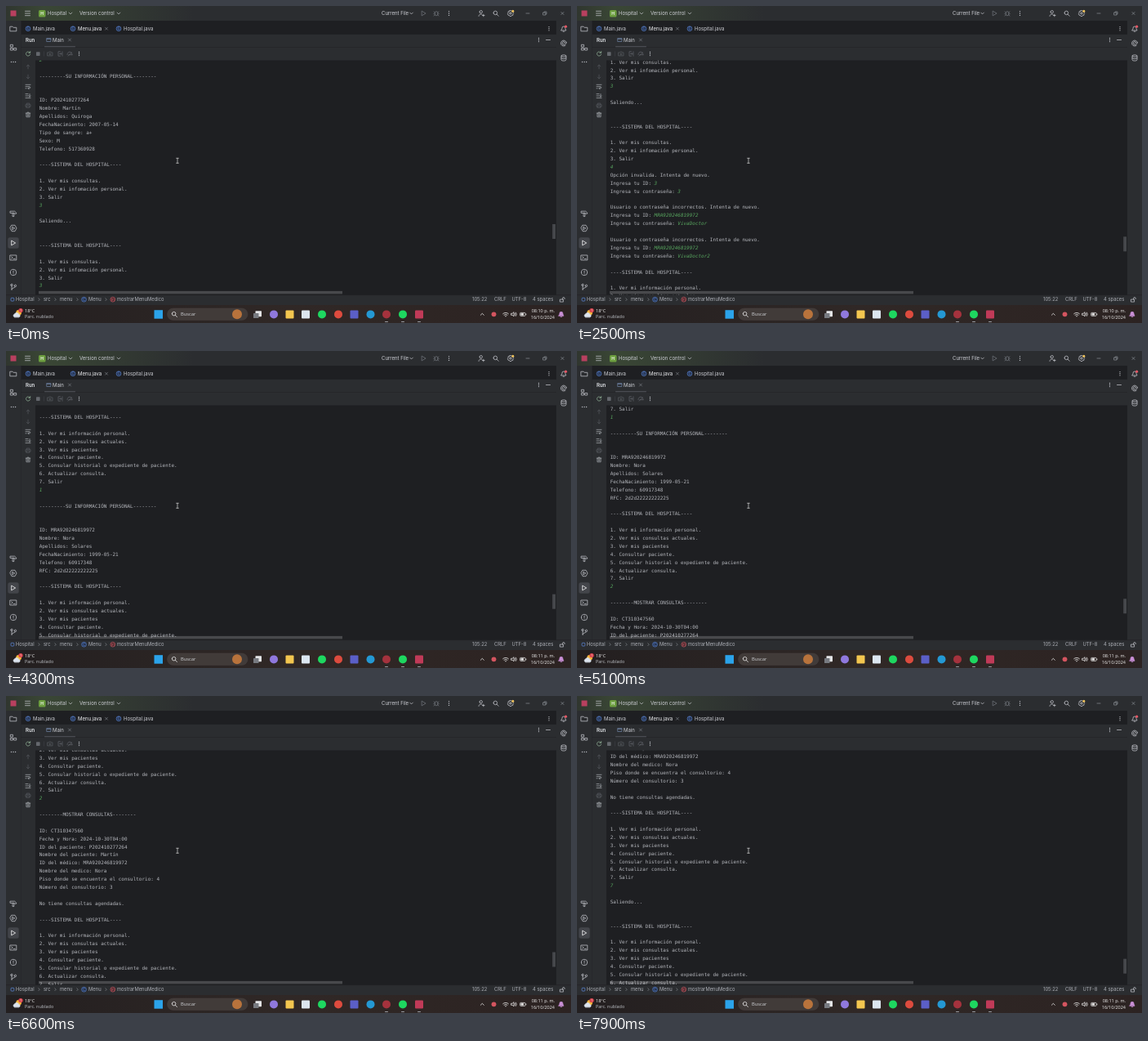
Animation of 692 by 388 pixels, one loop 8 s. Source, as an HTML page:

```html
<!DOCTYPE html>
<html lang="es">
<head>
<meta charset="utf-8">
<style>
html, body { margin: 0; width: 100%; height: 100%; overflow: hidden; background: #1e1f22; }
svg { display: block; width: 692px; height: 388px; }
text { font: 6px Inter, sans-serif; fill: #cdcfd5; white-space: pre; }
.strong { font-weight: 600; fill: #e4e6ea; }
.mono text { font: 5.98px "DejaVu Sans Mono", monospace; fill: #b4b6bc; }
.mono tspan { fill: #58a65f; font-style: italic; }
.task text { font: 5.5px "Open Sans", sans-serif; fill: #f0f0f0; }
.task .search { font-size: 5.8px; fill: #d2d4d8; }
</style>
</head>
<body>
<svg id="stage" viewBox="0 0 692 388">
  <defs>
    <clipPath id="view"><rect x="36" y="66.5" width="637" height="287"/></clipPath>
    <linearGradient id="tint">
      <stop offset="0" stop-color="#30362f"/>
      <stop offset=".2" stop-color="#3a4735"/>
      <stop offset="1" stop-color="#2b2d30"/>
    </linearGradient>
    <linearGradient id="bar">
      <stop offset="0" stop-color="#231f20"/>
      <stop offset=".5" stop-color="#302826"/>
      <stop offset="1" stop-color="#2c2322"/>
    </linearGradient>
  </defs>
</svg>
<script>
const PITCH = 9.88, FIRST_Y = 87.6;
const stage = document.getElementById('stage');

// Drawing helpers, each returns markup
const rect = (x, y, w, h, fill, r = 0, more = '') =>
  `<rect x="${x}" y="${y}" width="${w}" height="${h}" rx="${r}" fill="${fill}" ${more}/>`;
const dot = (x, y, r, fill, more = '') =>
  `<circle cx="${x}" cy="${y}" r="${r}" fill="${fill}" ${more}/>`;
const label = (x, y, s, more = '') => `<text x="${x}" y="${y + 2.1}" ${more}>${s}</text>`;
const icon = (x, y, d, color = '#c3c5cb', fill = 'none') =>
  `<path transform="translate(${x} ${y})" d="${d}" fill="${fill}" stroke="${color}" stroke-width=".75" stroke-linecap="round" stroke-linejoin="round"/>`;
const circ = r => `M${-r} 0a${r} ${r} 0 1 0 ${2 * r} 0a${r} ${r} 0 1 0 ${-2 * r} 0`;
const dots = (x, y, dx, dy) =>
  [-1, 0, 1].map(i => dot(x + i * dx, y + i * dy, .65, '#c3c5cb')).join('');
const badge = (x, y, s, line, fill) =>
  dot(x, y, 2.9, fill, `stroke="${line}" stroke-width=".6"`) +
  `<text x="${x}" y="${y + 1.5}" text-anchor="middle" style="font-size:4.2px;fill:${line}">${s}</text>`;
const classIcon = (x, y) => badge(x, y, 'C', '#5f8be0', '#25324d');

const CHEVRON = 'M-1.8-.9L0 .9L1.8-.9';
const CROSS = 'M-1.5-1.5L1.5 1.5M1.5-1.5L-1.5 1.5';
const PLAY = 'M-2-2.7L2.6 0L-2 2.7Z';
const GLASS = 'M-3-.6a2.3 2.3 0 1 0 4.6 0a2.3 2.3 0 1 0-4.6 0M1 1.1L3.2 3.3';
const BELL = 'M-3 2H3L2-.4V-1a2 2 0 0 0-4 0V-.4ZM-.8 3.2H.8';

// Console transcript; text after ~ is typed by the user
const title = s => `----${s}----`;
const patientMenu = choice => [title('SISTEMA DEL HOSPITAL'), '', '1. Ver mis consultas.',
  '2. Ver mi infomación personal.', '3. Salir', '~' + choice];
const doctorMenu = choice => [title('SISTEMA DEL HOSPITAL'), '', '1. Ver mi información personal.',
  '2. Ver mis consultas actuales.', '3. Ver mis pacientes', '4. Consultar paciente.',
  '5. Consular historial o expediente de paciente.', '6. Actualizar consulta.', '7. Salir', '~' + choice];
const login = (id, pass) => ['Ingresa tu ID: ~' + id, 'Ingresa tu contraseña: ~' + pass, ''];
const leave = ['', 'Saliendo...', '', ''];
const personal = ['---------SU INFORMACIÓN PERSONAL--------', '', ''];
const wrong = 'Usuario o contraseña incorrectos. Intenta de nuevo.';
const doctorId = 'MRA920246819972', patientId = 'P202410277264';
const lines = [
  '~2', '', ...personal,
  'ID: ' + patientId, 'Nombre: Martín', 'Apellidos: Quiroga', 'FechaNacimiento: 2007-05-14',
  'Tipo de sangre: a+', 'Sexo: M', 'Telefono: 517360928', '',
  ...patientMenu(3), ...leave, ...patientMenu(3), ...leave, ...patientMenu(4),
  'Opción invalida. Intenta de nuevo.', ...login(3, 3),
  wrong, ...login(doctorId, 'VivaDoctor'), wrong, ...login(doctorId, 'VivaDoctor2'),
  ...doctorMenu(1), '', ...personal,
  'ID: ' + doctorId, 'Nombre: Nora', 'Apellidos: Solares', 'FechaNacimiento: 1999-05-21',
  'Telefono: 60917348', 'RFC: 2d2d22222222225', '',
  ...doctorMenu(2), '', '--------MOSTRAR CONSULTAS--------', '',
  'ID: CT310347560', 'Fecha y Hora: 2024-10-30T04:00', 'ID del paciente: ' + patientId,
  'Nombre del paciente: Martín', 'ID del médico: ' + doctorId, 'Nombre del medico: Nora',
  'Piso donde se encuentra el consultorio: 4', 'Número del consultorio: 3', '',
  'No tiene consultas agendadas.', '',
  ...doctorMenu(7), ...leave, ...doctorMenu(7)
];
const transcript = lines.map((s, i) => {
  const [out, typed] = s.split('~');
  return `<text x="40.7" y="${FIRST_Y + (i - 2) * PITCH}">${out}${typed ? `<tspan>${typed}</tspan>` : ''}</text>`;
}).join('');

const panels = rect(0, 0, 692, 388, '#1e1f22') + rect(0, 0, 692, 18, '#2b2d30') +
  rect(0, 0, 230, 18, 'url(#tint)') + rect(0, 18, 18.5, 336, '#2b2d30') +
  rect(674, 18, 18, 336, '#2b2d30') + rect(18.5, 34.5, 655.5, 32, '#2b2d30') +
  rect(18.5, 66, 17.5, 288, '#2b2d30') + rect(18.5, 34, 655.5, .6, '#1e1f22') +
  rect(18.5, 50, 655.5, .5, '#1e1f22') + rect(0, 353.7, 692, 12.5, '#2b2d30') +
  rect(0, 353.6, 692, .5, '#1e1f22');

const titleBar = rect(5.5, 5.5, 7, 7, '#b8405f') +
  icon(26.5, 9, 'M-3-2.7H3M-3 0H3M-3 2.7H3') + rect(40, 5, 8.5, 8.5, '#6c9e3f', 1.5) +
  `<text x="44.2" y="11" text-anchor="middle" style="font-size:5px;font-weight:600;fill:#fff">H</text>` +
  label(51, 9, 'Hospital') + icon(79, 9, CHEVRON) +
  label(90, 9, 'Version control') + icon(138, 9, CHEVRON) +
  label(460, 9, 'Current File') + icon(496.5, 9, CHEVRON) + icon(511.5, 9, PLAY, '#6f737a') +
  icon(527, 9, 'M-1.8-.5a1.8 1.8 0 0 1 3.6 0V1a1.8 1.8 0 0 1-3.6 0ZM-3-2L-1.8-.8M3-2L1.8-.8M-3.2.6H-1.8M3.2.6H1.8M-3 3L-1.6 1.8M3 3L1.6 1.8', '#6f737a') +
  dots(542.5, 9, 0, 2.4) +
  icon(582, 9, 'M-2-1.8a1.7 1.7 0 1 0 3.4 0a1.7 1.7 0 1 0-3.4 0M-3 3.4C-3 .4 1 .4 1.4 2M1.5 2.5H4M2.8 1.2V3.8') +
  icon(600, 9, GLASS) +
  icon(618, 9, circ(1.2) + 'M-1-3.4H1L1.6-2.3L3-2.2L3.7-.5L3 .6L3 2.2L1.5 2.5L.9 3.5H-1L-1.6 2.4L-3 2.2L-3.6.5L-3-.7L-3-2.2L-1.6-2.4Z') +
  dot(620.8, 6.2, 1.5, '#f2c55c') +
  icon(639, 9, 'M-2 0H2', '#85888f') +
  icon(660, 9, 'M-2-1H1V2H-2ZM-1-1V-2H2V1H1', '#85888f') + icon(681.5, 9, CROSS, '#85888f');

const tabs = [[27, 'Main.java'], [82, 'Menu.java', 'style="fill:#f0f1f4"'], [138, 'Hospital.java']]
  .map(([x, s, more]) => classIcon(x, 27.7) + label(x + 6, 27.7, s, more)).join('') +
  icon(123, 27.7, CROSS, '#75787f') + dots(665, 27.7, 0, 2.1);

const runHeader = label(24, 41.5, 'Run', 'class="strong"') +
  icon(52.5, 41.5, 'M-2.4-2H2.4V2H-2.4ZM-2.4-.9H2.4', '#6b7f9f') + label(57, 41.5, 'Main') +
  icon(78, 41.5, CROSS, '#75787f') + rect(47, 49.2, 38, 1, '#54575d', .5) +
  dots(652.5, 41.5, 0, 2.1) + icon(664, 41.5, 'M-2.5 0H2.5') +
  icon(27, 58.5, 'M2.4-1.2A2.6 2.6 0 1 0 2.6.8M2.7-3V-1.1H.8', '#8fae95') +
  rect(37, 56.3, 4.6, 4.6, '#65686e', .6) + rect(46, 55.5, .5, 6, '#43454a') +
  icon(54, 58.5, 'M-3-1.6H-1.4L-.8-2.5H.8L1.4-1.6H3V2.4H-3ZM-1 .4a1 1 0 1 0 2 0a1 1 0 1 0-2 0', '#55585e') +
  icon(66.5, 58.5, 'M0-2.7H-2.5V2.7H0M2.5-2.7V2.7M-1 0H1.5M.4-1.1L1.5 0L.4 1.1', '#5c5f66') +
  icon(78, 58.5, 'M-3 1.2C-3-3.6 3-3.6 3 1.2M-2 2.6L2.6-1.6M-1 1.2H3', '#5c5f66') +
  dots(89.5, 58.5, 0, 2.1);

const consoleTools = icon(27, 74.5, 'M0 2.4V-2.4M-1.8-.6L0-2.4L1.8-.6', '#53565c') +
  icon(27, 86.5, 'M0-2.4V2.4M-1.8.6L0 2.4L1.8.6', '#53565c') +
  icon(27, 98.3, 'M-3-2H3M-3 .3H2A1.2 1.2 0 0 1 2 2.5H0M1-1.4M1 1.4L0 2.5L1 3.4M-3 2.5H-2', '#a5a8ae') +
  icon(27, 110, 'M-3-2.4H0M-3 0H0M-3 2.6H3M2-2.4V1M.8 0L2 1.2L3.2 0', '#a5a8ae') +
  icon(27, 121.7, 'M-1.8-1V-2.6H1.8V-1M-1.8 1.5H-3V-1H3V1.5H1.8M-1.8.6H1.8V2.7H-1.8Z', '#53565c') +
  icon(27, 133, 'M-2.8-1.8H2.8M-1-1.8V-2.8H1V-1.8M-2.1-1.8V2.8H2.1V-1.8M-.7-.4V1.5M.7-.4V1.5', '#a5a8ae');

const sideBars = rect(2.3, 283.3, 13.4, 13.4, '#43454a', 2.5) +
  icon(9, 28, 'M-3.8-2.8H-1L0-1.7H3.8V2.8H-3.8Z') +
  icon(9, 50.5, 'M-3.3-3.2H-.6V-.5H-3.3ZM-3.3 1H-.6V3.5H-3.3ZM1 1H3.7V3.5H1Z') + dots(9, 68.5, 2.6, 0) +
  icon(9, 254, 'M-3.6-2.8H1.6L3.6-1V.2H1.4L1-.6H-3.6ZM-1-.6V3.6H.8V-.6') +
  icon(9, 272, 'M-2-3.7H2L4 0L2 3.7H-2L-4 0ZM-1-1.6L1.7 0L-1 1.6Z') +
  icon(9, 290, PLAY, '#fff') +
  icon(9, 308, 'M-3.8-3H3.8V3H-3.8ZM-2.2-1.2L-.8 0L-2.2 1.2M.3 1.4H2.2') +
  icon(9, 326, circ(3.7) + 'M0-1.9V.4M0 1.8V1.9') +
  icon(9, 344, 'M-2-1.6V3.6M-3.2-2.6a1.2 1.2 0 1 0 2.4 0a1.2 1.2 0 1 0-2.4 0M1.2-1.6a1.2 1.2 0 1 0 2.4 0a1.2 1.2 0 1 0-2.4 0M2.4-.4C2.4 1.5-2 .5-2 2.6') +
  icon(683, 28, BELL) + dot(685.6, 25.2, 1.6, '#e55765') +
  icon(683, 45.5, 'M3.4-1A3.5 3.5 0 1 0 2 3M2-.2A2 2 0 1 0 0 2C2 2 3.4 1 3.4-1M-.2 0H.2') +
  icon(683, 63.5, 'M-3-2.4a3 1.2 0 1 0 6 0a3 1.2 0 1 0-6 0V2.4a3 1.2 0 0 0 6 0V-2.4M-3 0a3 1.2 0 0 0 6 0');

const statusBar = rect(6, 357.3, 3.8, 3.8, 'none', .8, 'stroke="#5f8be0" stroke-width=".7"') +
  [[12, 'Hospital'], [46, 'src'], [66, 'menu'], [101, 'Menu'], [136, 'mostrarMenuMedico'],
    [571, '105:22'], [598, 'CRLF'], [619.5, 'UTF-8'], [645, '4 spaces']]
    .map(([x, s]) => label(x, 359.2, s, 'style="font-size:5.85px;fill:#acafb6"')).join('') +
  [40.5, 60.5, 87.5, 122.5].map(x => icon(x, 359.2, 'M-.7-1.5L.8 0L-.7 1.5', '#7a7e85')).join('') +
  classIcon(95.5, 359.2) + badge(130.8, 359.2, 'm', '#e0646c', '#40252b') +
  icon(681, 359.5, 'M-2.2-.4H1.6V2.6H-2.2ZM.6-.4V-1.6a1.3 1.3 0 0 1 2.6 0V-1');

const apps = [[328, '#8f78dd', 5], [347.5, '#f3c64f', 1], [367, '#dce6f0', 1], [387, '#1ed760', 5],
  [407, '#dd4b3e', 5], [426.5, '#5b5fc7', 1], [446.5, '#2498d3', 5], [466, '#a5323d', 5],
  [486, '#1ed760', 5], [506, '#c03a58', 1]];
const taskBar = rect(0, 366, 692, 22, 'url(#bar)') +
  dot(15.6, 375.3, 3.4, '#f5b63d') +
  icon(13.5, 378.4, 'M-3.3 2.4A2 2 0 0 1-3-1.3A2.8 2.8 0 0 1 2.2-1A1.8 1.8 0 0 1 2.6 2.4Z', '#dde4ee', '#dde4ee') +
  dot(18, 372.6, 2.7, '#d9434e') + '<text x="16.9" y="374.1" style="font-size:4px">1</text>' +
  label(23, 373, '18°C') + label(23, 380.3, 'Parc. nublado', 'style="fill:#c0c3c8"') +
  rect(181.5, 372.2, 10.5, 10.5, '#2ba3ea') +
  rect(197.5, 370, 98.5, 14.5, '#413b39', 7.2, 'stroke="#4c4644" stroke-width=".4"') +
  icon(206.3, 377.3, GLASS, '#f0f0f0') + label(214, 377.3, 'Buscar', 'class="search"') +
  dot(283, 377.3, 6, '#b8733c') +
  rect(305.5, 373.2, 7.5, 7, '#e4e5e7', .6) + rect(303, 376, 6.5, 6, '#777a80', .6) +
  apps.map(([x, c, r]) => rect(x - 5, 372.4, 10, 10, c, r)).join('') +
  [466, 486, 506].map(x => rect(x - 2, 386, 4, 1, '#9a9da3', .5)).join('') +
  icon(583.3, 377.3, 'M-2 1L0-1L2 1', '#f0f0f0') + dot(597.5, 377.3, 2.9, '#d45560') +
  icon(612, 378, 'M-3.4-1.3A4.8 4.8 0 0 1 3.4-1.3M-2 .2A2.9 2.9 0 0 1 2 .2M-.5 1.7H.5', '#f0f0f0') +
  icon(622, 377.3, 'M-3-1H-1.8L0-2.6V2.6L-1.8 1H-3ZM1.2-1.2A1.8 1.8 0 0 1 1.2 1.2M2.4-2.2A3.2 3.2 0 0 1 2.4 2.2', '#f0f0f0') +
  rect(629.6, 375.4, 6.4, 4, 'none', .8, 'stroke="#f0f0f0" stroke-width=".7"') +
  rect(630.4, 376.2, 3.6, 2.4, '#f0f0f0') + rect(636.5, 376.6, .8, 1.6, '#f0f0f0') +
  label(672, 373, '', 'id="clock" text-anchor="end"') + label(672, 380.6, '16/10/2024', 'text-anchor="end"') +
  icon(680, 377.3, BELL, '#c98fd6', '#c98fd6');

stage.insertAdjacentHTML('beforeend', panels + titleBar + tabs + runHeader + consoleTools + sideBars +
  `<g class="mono" clip-path="url(#view)"><g id="log">${transcript}</g></g>` +
  rect(40, 348.9, 372, 3.5, '#fff', 0, 'opacity=".19"') +
  rect(669.2, 0, 3.8, 18, '#46484c', 0, 'id="thumb"') +
  icon(210, 189.3, 'M-1.3-3H1.3M0-3V3M-1.3 3H1.3', '#c8c8c8') +
  statusBar + `<g class="task">${taskBar}</g>`);

// Wheel scrolling: [time in ms, distance in px]
const keys = [[0, 0], [500, 59], [1000, 59], [1400, 118], [2100, 206.3], [2300, 206.3], [2500, 244.2],
  [3300, 357.3], [3500, 357.3], [3700, 399.7], [4500, 518.4], [4800, 518.4], [5100, 577.8],
  [6600, 740.8], [7000, 788.2], [7300, 788.2], [7900, 871], [8000, 871]];
function scrollAt(t) {
  const i = keys.findIndex(k => k[0] > t);
  const [t0, s0] = keys[i - 1], [t1, s1] = keys[i];
  return s0 + (s1 - s0) * (t - t0) / (t1 - t0);
}

const log = document.getElementById('log');
const thumb = document.getElementById('thumb');
const clock = document.getElementById('clock');
function draw(now) {
  const t = Math.floor(now % 8000 / 100) * 100; // the picture steps ten times a second
  const s = scrollAt(t);
  log.setAttribute('transform', `translate(0 ${-s})`);
  thumb.setAttribute('y', 267 + s * .0628);
  clock.textContent = t < 2800 ? '08:10 p. m.' : '08:11 p. m.';
  requestAnimationFrame(draw);
}
draw(performance.now());
</script>
</body>
</html>
```
